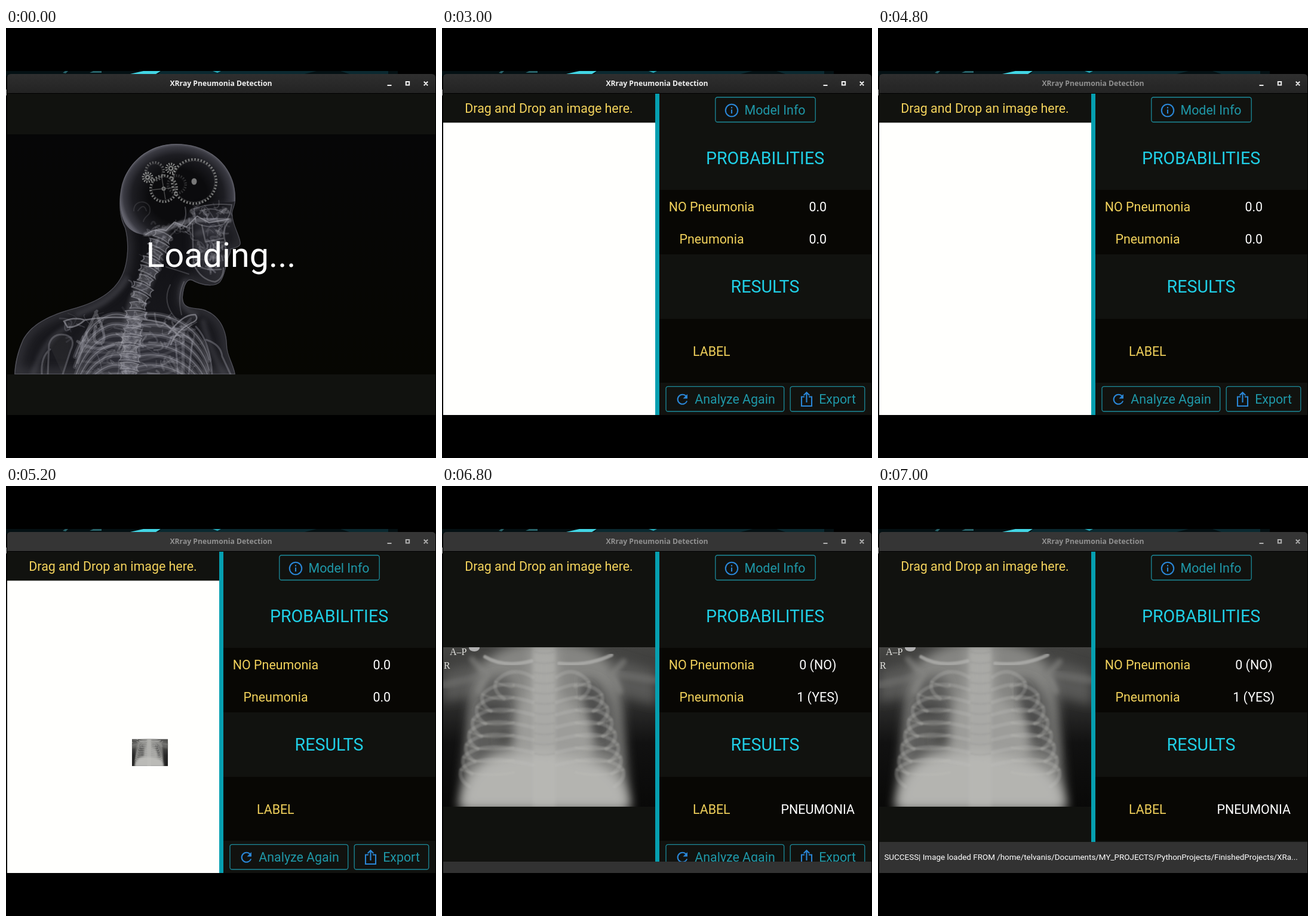
An HTML page for the animation above (8 s loop, 720x720 px).

```html
<!DOCTYPE html>
<html lang="en">
<head>
<meta charset="utf-8">
<title>Pneumonia Detection</title>
<style>
  html, body { margin: 0; width: 100%; height: 100%; overflow: hidden; background: #000; }
  svg { display: block; width: 100vw; height: 100vh; }
  text { font-family: Roboto, "Open Sans", sans-serif; font-size: 21.4px; }
  .mid { text-anchor: middle; }
  .head { font-size: 28.6px; fill: #20cfe6; }
  .label { fill: #f2d25c; }
  .value { fill: #fff; }
  .button rect { fill: none; stroke: #1c8b9b; stroke-width: 1.3; }
  .button text { fill: #1f98a8; }
  .icon { fill: none; stroke: #2a86d6; stroke-width: 2.1; }
  .line { fill: none; stroke-linecap: round; }
</style>
</head>
<body>
<svg viewBox="0 0 720 720">
  <defs>
    <linearGradient id="barFill" x2="0" y2="1">
      <stop stop-color="#2f2f2f"/><stop offset="1" stop-color="#232323"/>
    </linearGradient>
    <linearGradient id="sceneFill" x2="0" y2="1">
      <stop stop-color="#060607"/><stop offset="1" stop-color="#060602"/>
    </linearGradient>
    <linearGradient id="bodyFill" x2="0" y2="1">
      <stop stop-color="#0c0c0f"/><stop offset=".5" stop-color="#121216"/><stop offset="1" stop-color="#1c1c21"/>
    </linearGradient>
    <radialGradient id="skullFill" gradientUnits="userSpaceOnUse" cx="0" cy="0" r="98" gradientTransform="translate(288 281) scale(1 .9)">
      <stop offset=".5" stop-color="#0b0b0d"/><stop offset=".78" stop-color="#1d1d22"/><stop offset=".93" stop-color="#3a3a42"/><stop offset="1" stop-color="#62626c"/>
    </radialGradient>
    <linearGradient id="filmFill" x2="0" y2="1">
      <stop stop-color="#444442"/><stop offset=".3" stop-color="#343433"/><stop offset=".6" stop-color="#111"/><stop offset="1" stop-color="#090908"/>
    </linearGradient>
    <filter id="soft3" x="-30%" y="-30%" width="160%" height="160%"><feGaussianBlur stdDeviation="3"/></filter>
    <filter id="soft9" x="-40%" y="-40%" width="180%" height="180%"><feGaussianBlur stdDeviation="9"/></filter>
    <filter id="soft1"><feGaussianBlur stdDeviation="1"/></filter>
    <filter id="grainless"><feGaussianBlur stdDeviation=".55"/></filter>
    <path id="bodyShape" d="M285 194C238 194 205 225 194 262C187 292 190 318 199 335C206 360 204 395 193 416C180 442 152 458 118 468C72 480 42 496 28 522C18 545 15 562 14 580H384C381 562 370 548 370 530C369 500 354 478 330 471C312 467 297 471 296 452C297 436 302 418 312 423C330 433 351 434 359 425C367 414 367 400 372 390C371 382 378 378 376 371C384 368 393 367 393 360C391 345 380 330 379 311C379 304 384 298 384 288C386 235 345 194 285 194Z"/>
    <clipPath id="bodyClip"><use href="#bodyShape"/></clipPath>
    <clipPath id="sceneClip"><rect x="2" y="178" width="717" height="402"/></clipPath>
    <clipPath id="filmClip"><rect width="355" height="267"/></clipPath>
    <clipPath id="windowClip"><rect x="2" y="109" width="717" height="539"/></clipPath>

    <g id="film" clip-path="url(#filmClip)">
      <rect width="355" height="267" fill="url(#filmFill)"/>
      <path d="M0 40L70 20L92 60L50 82L0 92ZM355 38L285 18L262 60L300 82L355 96Z" fill="#595957" filter="url(#soft9)"/>
      <path d="M66 26Q100 -5 155 -10H195Q250 -5 280 26Q300 70 300 125L313 270H27L42 130Q44 65 66 26Z" fill="#858582" filter="url(#soft9)"/>
      <path d="M62 70Q88 35 112 55Q122 105 128 155Q85 170 46 205Q42 130 62 70ZM232 52Q266 50 286 95Q298 150 296 190Q272 172 246 168Q256 115 232 52Z" fill="#5c5c5a" filter="url(#soft9)"/>
      <ellipse cx="82" cy="105" rx="23" ry="12" fill="#3d3d3c" opacity=".8" filter="url(#soft9)"/>
      <ellipse cx="108" cy="154" rx="18" ry="9" fill="#3c3c3b" opacity=".8" filter="url(#soft9)"/>
      <path d="M236 65Q256 105 262 150" fill="none" stroke="#414140" stroke-width="15" filter="url(#soft9)"/>
      <path d="M146 0H192L196 80Q250 115 252 165L246 200H120Q108 130 142 70Z" fill="#a2a29f" opacity=".85" filter="url(#soft9)"/>
      <path d="M30 270Q36 195 100 182Q165 170 230 186Q306 200 310 270Z" fill="#b4b4b0" filter="url(#soft9)"/>
      <rect x="150" width="38" height="267" fill="#bdbdb9" opacity=".4" filter="url(#soft3)"/>
      <g id="filmBones" class="line" filter="url(#soft1)"></g>
      <path class="line" d="M70 16Q102 35 148 23M282 13Q242 32 194 27" stroke="#b6b6b3" stroke-width="6" opacity=".7" filter="url(#soft1)"/>
      <path class="line" d="M48 20L72 46L60 74M302 24L284 44L296 74" stroke="#8b8b88" stroke-width="10" opacity=".5" filter="url(#soft3)"/>
      <path class="line" d="M0 63L68 48M355 55L292 45" stroke="#777775" stroke-width="13" opacity=".45" filter="url(#soft3)"/>
      <ellipse cx="52" cy="1" rx="9" ry="6" fill="#ccc" opacity=".8"/>
      <g fill="#e4e4e0">
        <text x="11" y="13" style="font:16px 'Liberation Serif',serif">A–P</text>
        <text x="1" y="36" style="font:16px 'Liberation Serif',serif">R</text>
      </g>
    </g>
  </defs>

  <rect width="720" height="720"/>
  <path d="M0 72H656V80H0Z" fill="#041013"/>
  <path d="M260 72H520L500 77H255ZM560 72H640V77H575Z" fill="#0a2930"/>
  <path d="M208 77L230 72H259L251 77Z" fill="#42d5e4"/>
  <path d="M346 72H360L354 75Z" fill="#27aebd"/>
  <path d="M95 75L99 72H104L100 76ZM140 75L146 72H160V75Z" fill="#28636a"/>
  <path d="M0 103V113" stroke="#aaa" stroke-width="2"/>

  <path d="M2 109V83Q2 77 8 77H713Q719 77 719 83V109Z" fill="url(#barFill)"/>
  <path id="idleBar" d="M2 109V83Q2 77 8 77H713Q719 77 719 83V109Z" fill="#353535"/>
  <text id="title" class="mid" x="360" y="97.4" style="font:600 12.2px 'Noto Sans','Open Sans',sans-serif">XRray Pneumonia Detection</text>
  <g id="controls" fill="none" stroke="#f2f2f2" stroke-width="2">
    <path d="M638.5 96H645.5M669.8 90H675.2V95.4H669.8ZM699.8 89.8L706.2 96.2M706.2 89.8L699.8 96.2"/>
  </g>

  <g id="loading">
    <rect x="2" y="110" width="717" height="538" fill="#11120f"/>
    <rect x="2" y="178" width="717" height="402" fill="url(#sceneFill)"/>
    <g clip-path="url(#sceneClip)">
      <use href="#bodyShape" fill="url(#bodyFill)"/>
      <g clip-path="url(#bodyClip)">
        <use href="#bodyShape" fill="none" stroke="#5c5c64" stroke-width="12" opacity=".55" filter="url(#soft9)"/>
        <path d="M285 194C225 194 191 238 191 290C191 328 208 346 238 347C268 338 292 324 312 302C338 292 365 294 384 290C386 235 345 194 285 194Z" fill="url(#skullFill)"/>
        <use href="#bodyShape" fill="none" stroke="#73737d" stroke-width="2.6" opacity=".5" filter="url(#grainless)"/>
        <path class="line" d="M45 580C58 545 72 515 105 500M365 580C345 545 338 520 330 492M202 420C182 454 150 468 120 480M300 425C286 450 300 475 318 480" stroke="#55555d" stroke-width="9" opacity=".4" filter="url(#soft3)"/>
        <ellipse cx="222" cy="540" rx="100" ry="52" fill="#4a4a53" opacity=".42" filter="url(#soft9)"/>
        <path d="M312 305L375 300L368 345L362 415L335 422L314 395Z" fill="#50505a" opacity=".4" filter="url(#soft9)"/>
        <g id="bones" class="line" stroke="#a5a5ae" filter="url(#grainless)"></g>
        <g id="gears" fill="none" stroke="#858685" filter="url(#grainless)"></g>
      </g>
    </g>
    <text class="mid value" x="360" y="400.2" style="font-size:57.5px">Loading...</text>
  </g>

  <g id="main" clip-path="url(#windowClip)">
    <rect x="2" y="110" width="717" height="538" fill="#11120f"/>
    <rect id="dropArea" x="2" y="158.5" width="355" height="489.5" fill="#fffffd"/>
    <use id="photo" href="#film" x="2" y="270"/>
    <rect x="357" y="110" width="7" height="538" fill="#069fb0"/>
    <path d="M364 271H719V379H364ZM364 487H719V594H364Z" fill="#080704"/>
    <text class="mid label" x="179" y="142.3">Drag and Drop an image here.</text>
    <text class="mid head" x="541" y="227.7">PROBABILITIES</text>
    <text class="mid label" x="451.5" y="306.7">NO Pneumonia</text>
    <text class="mid label" x="451.5" y="360.5">Pneumonia</text>
    <text class="mid head" x="541" y="442.7">RESULTS</text>
    <text class="mid label" x="451.3" y="548.7">LABEL</text>
    <text id="negative" class="mid value" x="629.3" y="306.7"></text>
    <text id="positive" class="mid value" x="629.3" y="360.5"></text>
    <text id="verdict" class="mid value" x="629.3" y="548.7"></text>
    <g class="button">
      <rect x="457.8" y="116" width="167.4" height="41.5" rx="3.5"/>
      <rect x="375" y="600.3" width="197.7" height="41.7" rx="3.5"/>
      <rect x="583.2" y="600.3" width="124.6" height="41.7" rx="3.5"/>
      <text class="mid" x="557.5" y="145.3">Model Info</text>
      <text class="mid" x="490.5" y="629.3">Analyze Again</text>
      <text class="mid" x="662" y="629.3">Export</text>
    </g>
    <g class="icon">
      <circle cx="485" cy="138" r="10.2"/>
      <path d="M485 136.5V143.3M485 132.2V134.4"/>
      <path d="M408.7 616.5A8 8 0 1 0 410.2 624.5"/>
      <path d="M411 613V620.5H403.5Z" fill="#2a86d6" stroke="none"/>
      <path d="M607 617.5H602V633H619V617.5H614M610.5 627V611M605.7 615L610.5 610.2L615.3 615"/>
    </g>
    <use id="dragged" href="#film" opacity=".9"/>
    <g id="snackbar">
      <rect x="2" width="717" height="52" fill="#323232"/>
      <text class="value" x="10.4" y="30.4" style="font-size:13.43px">SUCCESS| Image loaded FROM /home/telvanis/Documents/MY_PROJECTS/PythonProjects/FinishedProjects/XRa...</text>
    </g>
  </g>
</svg>
<script>
const LOOP = 8000, STEP = 100;
const el = id => document.getElementById(id);
const clamp = v => Math.max(0, Math.min(1, v));

let seed = 7;
function random() {
  seed = (seed * 16807) % 2147483647;
  return seed / 2147483647;
}

function add(parent, tag, attrs) {
  const node = document.createElementNS('http://www.w3.org/2000/svg', tag);
  for (const key in attrs) node.setAttribute(key, attrs[key]);
  return parent.appendChild(node);
}

function stroke(parent, d, width, opacity, extra) {
  return add(parent, 'path', { d, 'stroke-width': width, opacity, ...extra });
}

// Short translucent fibres that give bone its layered look
function fibres(parent, x, y, w, h, count, length) {
  for (let i = 0; i < count; i++) {
    const x0 = x + w * random(), y0 = y + h * random();
    const bend = () => (random() - 0.5) * 2 * length;
    stroke(parent, `M${x0} ${y0}q${bend()} ${bend()} ${bend()} ${bend()}`, 1 + 3 * random(), 0.1 + 0.2 * random());
  }
}

function gear(x, y, r, teeth, opacity) {
  const g = add(el('gears'), 'g', { transform: `translate(${x} ${y})`, opacity });
  const pitch = 2 * Math.PI * r / teeth;
  add(g, 'circle', { r, 'stroke-width': 4, 'stroke-dasharray': `${pitch * 0.5} ${pitch * 0.5}` });
  add(g, 'circle', { r: r - 2.5, 'stroke-width': 1, opacity: 0.4 });
  return g;
}

function drawGears() {
  gear(286, 262, 15, 22, 0.3);
  gear(249, 240, 15, 20, 0.6);
  const big = gear(315, 257, 37, 44, 0.85);
  add(big, 'ellipse', { rx: 4.5, ry: 5.5, fill: '#8c8c8c', stroke: 'none' });
  const spoked = gear(264, 269, 22, 28, 0.85);
  add(spoked, 'path', { d: 'M-19 2L19 -2M-3 -18L3 18', 'stroke-width': 1.5, opacity: 0.6 });
  add(spoked, 'circle', { r: 2.5, 'stroke-width': 2 });
  for (const [x, y] of [[237, 250], [276, 235]]) {
    const small = gear(x, y, 7.5, 12, 1);
    add(small, 'circle', { r: 3, 'stroke-width': 2 });
  }
}

function drawBones() {
  const g = el('bones');
  // Skull base, ear, eye socket, jaw and teeth
  stroke(g, 'M234 346Q260 341 282 331Q310 317 374 322', 8, 0.42, { filter: 'url(#soft1)' });
  stroke(g, 'M234 346Q250 334 268 339L282 325L302 333L320 315L340 326L373 320', 2, 0.6);
  stroke(g, 'M214 306C214 286 240 288 241 303C242 316 233 312 230 324M221 306Q231 292 235 306', 2, 0.16);
  stroke(g, 'M315 303Q340 292 378 296Q376 315 365 328Q340 338 318 326ZM325 306Q350 298 365 311M300 300Q304 320 292 333', 2, 0.35);
  stroke(g, 'M312 328L314 395Q326 422 350 425Q364 420 364 402M314 392Q330 408 360 404M328 330L334 358L365 352M372 325Q360 340 368 360', 2.5, 0.38);
  stroke(g, 'M336 366Q352 370 369 366M336 384Q352 389 367 384', 10, 0.32, { 'stroke-dasharray': '3 2', 'stroke-linecap': 'butt' });
  stroke(g, 'M318 345Q340 335 362 344M318 365L360 390M320 390L360 360', 7, 0.18, { filter: 'url(#soft3)' });
  fibres(g, 238, 328, 70, 14, 26, 14);
  fibres(g, 312, 300, 58, 45, 34, 16);
  fibres(g, 316, 350, 46, 62, 30, 16);

  // Spine
  stroke(g, 'M262 345C250 390 238 420 222 448C204 485 208 530 206 585', 24, 0.24, { filter: 'url(#soft3)' });
  for (let k = 0; k < 17; k++) {
    const y = 348 + k * 14.5, u = k / 16;
    const x = 206 + 56 * Math.pow(1 - u, 1.9);
    const w = 15 + 3 * Math.sin(k * 2.3), tilt = k < 8 ? 26 : 6;
    const bone = add(g, 'g', { transform: `translate(${x} ${y}) rotate(${tilt})` });
    stroke(bone, `M${-w} -3Q0 -8 ${w} -4Q${w - 5} 2 ${w} 7Q0 3 ${-w} 7Q${-w + 6} 2 ${-w} -3Z`, 1.8, 0.55, { fill: '#77777f', 'fill-opacity': 0.45 });
    fibres(bone, -w, -5, 2 * w, 12, 6, 9);
  }

  // Ribs
  for (let k = 0; k < 7; k++) {
    const y = 484 + k * 17;
    const left = `M205 ${y}C175 ${y - 14} 138 ${y + 4} 116 ${y + 66}`;
    const right = `M216 ${y}C255 ${y - 16} 325 ${y + 8} 340 ${y + 72}`;
    const front = `M128 ${y + 40}Q220 ${y + 52} 294 ${y + 16}`;
    for (const d of [left, right]) {
      stroke(g, d, 8, 0.22);
      stroke(g, d, 2, 0.4);
    }
    stroke(g, front, 4, 0.16);
  }
  fibres(g, 130, 485, 190, 95, 60, 26);

  // Collarbones, shoulder blades, breastbone and upper arms
  stroke(g, 'M97 491Q115 483 132 489Q118 502 103 501ZM132 489Q190 478 265 494L292 517M272 512Q296 478 317 480Q324 489 310 494Q285 507 276 530', 2.5, 0.58, { fill: '#888890', 'fill-opacity': 0.2 });
  stroke(g, 'M152 474L134 512L120 560M150 476Q172 520 160 528Q142 530 150 500M120 525Q150 545 180 530', 5, 0.35);
  stroke(g, 'M72 530Q78 510 100 514Q118 520 108 540L95 580M72 530L70 580M60 580Q58 550 74 538', 3, 0.34, { fill: '#66666c', 'fill-opacity': 0.4 });
  stroke(g, 'M276 518Q300 508 312 524L306 580M284 526L288 580M335 522Q360 530 362 550L376 580M318 500Q342 525 345 580', 3, 0.36);
  stroke(g, 'M295 520L298 580', 16, 0.28, { filter: 'url(#soft3)' });
  stroke(g, 'M298 425Q286 450 294 480M268 400Q285 405 306 412M275 430Q260 460 285 487', 2, 0.26);
  fibres(g, 100, 482, 60, 60, 18, 18);
  fibres(g, 272, 485, 42, 50, 22, 18);
}

function drawFilmBones() {
  const g = el('filmBones');
  for (let k = 0; k < 8; k++) {
    const y = 46 + k * 21, spread = 22 * Math.sqrt(k);
    const l = 88 - spread, r = 244 + spread * 0.98;
    const light = { stroke: '#c0c0bc' };
    stroke(g, `M150 ${y + 4}Q${l + 26} ${y - 17} ${l} ${y + 12}Q${l - 5} ${y + 28} ${l + 14} ${y + 40}`, 6, 0.26, light);
    stroke(g, `M190 ${y + 4}Q${r - 26} ${y - 17} ${r} ${y + 12}Q${r + 5} ${y + 28} ${r - 14} ${y + 40}`, 6, 0.26, light);
    stroke(g, `M${l} ${y + 12}Q${l + 32} ${y + 26} 118 ${y + 17}M${r} ${y + 12}Q${r - 32} ${y + 26} 222 ${y + 17}`, 4, 0.2, light);
  }
  for (let y = 8; y < 190; y += 17) stroke(g, `M153 ${y}Q169 ${y + 4} 186 ${y}`, 3, 0.12, { stroke: '#777' });
}

function show(id, visible) {
  el(id).style.display = visible ? '' : 'none';
}

function render(time) {
  const t = Math.floor(time / STEP) * STEP;
  const done = t >= 6800;
  show('loading', t < 3000);
  show('main', t >= 3000);

  const idle = clamp((t - 4770) / 330);
  el('idleBar').setAttribute('opacity', idle);
  el('controls').setAttribute('opacity', 1 - 0.35 * idle);
  el('title').setAttribute('fill', t < 4800 ? '#f0f0f0' : '#909090');

  show('dragged', t >= 4900 && t < 5700);
  const away = (1 - clamp((t - 4800) / 700)) ** 2;
  el('dragged').setAttribute('transform', `translate(${97 + 620 * away} ${407 + 90 * away}) scale(.17)`);

  show('dropArea', !done);
  show('photo', done);
  el('negative').textContent = done ? '0 (NO)' : '0.0';
  el('positive').textContent = done ? '1 (YES)' : '0.0';
  el('verdict').textContent = done ? 'PNEUMONIA' : '';

  show('snackbar', done);
  const hidden = (1 - clamp((t - 6749) / 250)) ** 2;
  el('snackbar').setAttribute('transform', `translate(0 ${596 + 52 * hidden})`);
}

drawBones();
drawGears();
drawFilmBones();
const start = performance.now();
function tick() {
  render((performance.now() - start) % LOOP);
  requestAnimationFrame(tick);
}
tick();
</script>
</body>
</html>
```
